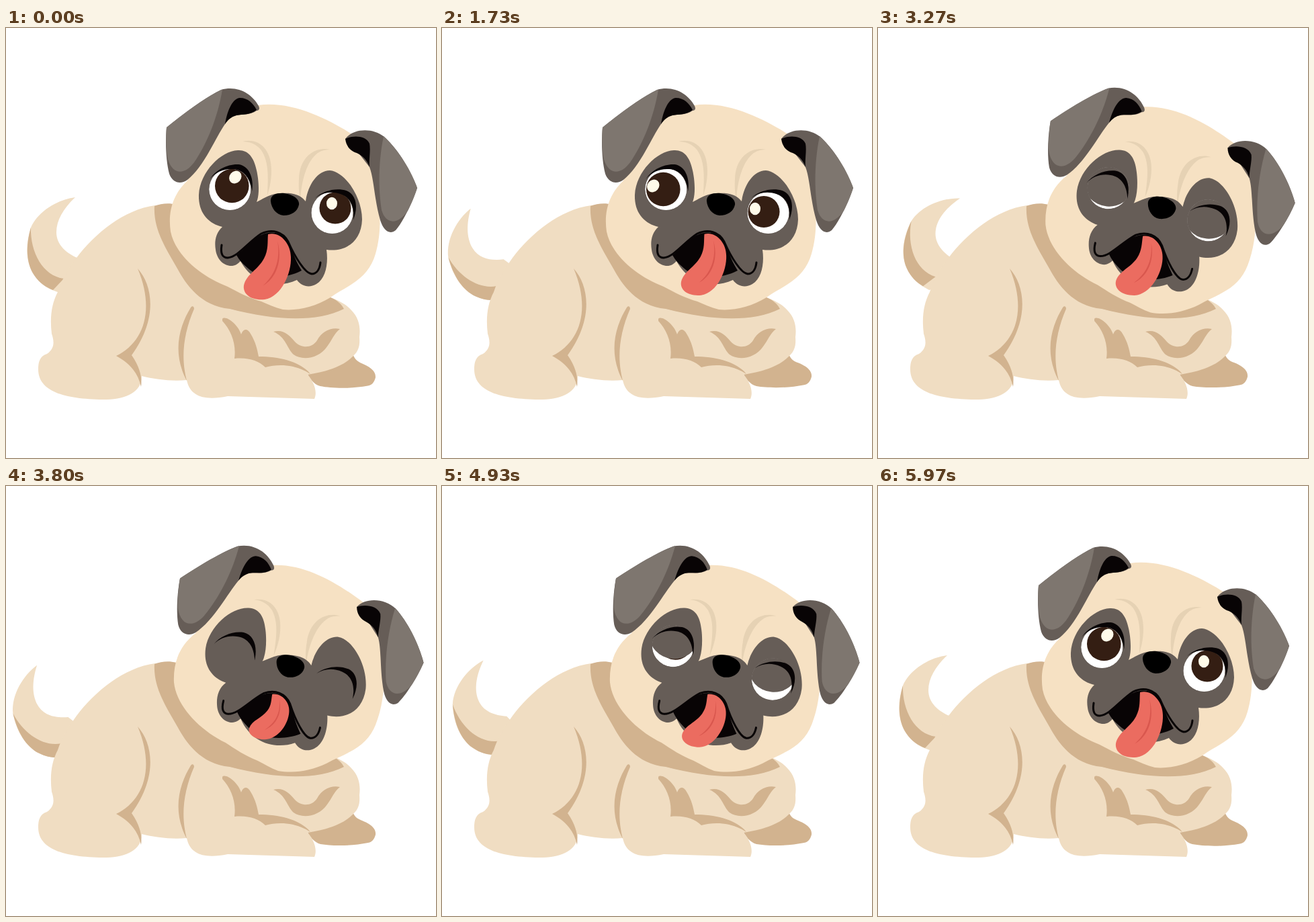
An HTML page that plays this animation: 640 px wide and 640 px high, repeating every 6.01 s.

```html
<!DOCTYPE html>
<html lang="en">
<head>
<meta charset="utf-8">
<title>Happy pug</title>
<style>
  html, body { margin: 0; width: 100%; height: 100%; overflow: hidden; background: #fff; }
  svg { display: block; width: 100vw; height: 100vh; }
  .coat { fill: #f0ddc2; }
  .face { fill: #f6e1c3; }
  .shade { fill: #d2b38f; }
  .fold { fill: #e6d2b4; }
  .mask { fill: #665d57; }
  .ear { fill: #7e766f; }
  .ink { fill: #080405; }
  .nose { fill: #000; }
  .white { fill: #fff; }
  .iris { fill: #341e13; }
  .glint { fill: #fffbea; }
  .tongue { fill: #eb6c60; }
  .crease { fill: #d9574e; }
  .lip { fill: none; stroke: #080405; stroke-width: 3; stroke-linecap: round; }
</style>
</head>
<body>
<svg viewBox="0 0 640 640" xmlns="http://www.w3.org/2000/svg">
  <defs>
    <clipPath id="socket"><circle r="31.3"/></clipPath>
  </defs>

  <g id="tail">
    <path class="coat" d="M103 252C78 255 48 272 37 297C28 325 30 350 42 368C52 383 66 390 80 394L120 375L106 342C90 335 75 323 75 304C75 285 87 267 103 252Z"/>
    <path class="shade" d="M37 297C29 325 30 350 42 368C50 380 60 386 70 390L86 373C55 369 36 334 37 297Z"/>
  </g>

  <path id="paw" class="shade" d="M514 480C518 492 522 495 530 498C545 504 551 511 550 519C548 526 545 530 539 531C515 536 485 536 468 533C458 530 452 522 446 510Z"/>

  <path class="coat" d="M105 342C132 306 176 270 222 264L252 262L400 330L483 401C498 407 507 412 514 420C525 431 528 445 526 460C527 472 525 481 517 488C502 504 478 511 449 516C458 526 464 541 459 552L330 548C296 555 274 549 269 524C246 526 222 523 202 518C203 540 180 553 150 553C92 553 48 543 48 508C48 498 50 488 61 485C74 476 71 464 68 455C65 430 68 410 77 393C82 377 92 360 105 342Z"/>
  <path class="shade" d="M221 265C230 261 245 260 252 263L340 320L483 401C492 405 498 409 503 418C460 439 400 435 333 418C290 414 268 382 255 358C238 328 219 300 221 265Z"/>

  <g class="shade">
    <path d="M196 358C220 385 225 435 187 487C198 503 203 518 201 534C197 515 186 500 164 488C205 468 222 420 196 358Z"/>
    <path d="M275 416C259 442 246 482 269 525C260 490 264 455 280 418C280 414 277 413 275 416Z"/>
    <path d="M322 433C326 427 345 440 350 456C353 448 359 446 364 455C372 468 374 479 376 489C410 489 440 498 453 515C430 500 405 500 386 505C376 495 360 490 340 492C343 470 335 450 322 436Z"/>
    <path d="M398 452C412 448 421 456 430 467C440 477 455 477 463 465C470 452 483 445 497 448C488 455 485 465 478 474C465 493 440 495 428 486C418 477 417 460 398 452Z"/>
  </g>

  <g id="head">
    <path class="face" d="M375 115C425 108 478 135 515 158C540 180 550 215 555 255C558 285 557 312 550 336C544 357 532 370 515 381C505 388 494 393 483 401C460 415 435 421 412 419C400 416 390 411 380 407C362 402 345 393 330 385C290 370 252 338 245 303C241 275 247 249 270 227C285 195 310 115 375 115Z"/>

    <path class="mask" d="M239 148C265 127 297 103 320 92C345 85 366 98 376 116C378 120 377 123 373 123C363 130 352 128 343 130C335 132 330 137 326 143C312 163 295 206 270 226C260 233 248 231 243 217C238 198 237 170 239 148Z"/>
    <path class="ear" d="M239 148C265 127 297 103 322 91.5C315 134 299 172 280 200C266 219 247 220 240 192C238 175 238 160 239 148Z"/>
    <path class="ink" d="M326 143C330 120 338 105 348 104C360 104 368 112 373 122C363 130 352 128 343 130C335 132 330 137 326 143Z"/>

    <path class="mask" d="M505 165C515 150 545 147 563 162C585 182 604 215 612 238C605 260 590 290 580 301C571 308 562 302 557 286C548 255 548 225 541 207L520 180Z"/>
    <path class="ear" d="M562 161C585 182 604 215 612 238C608 251 603 262 598 272C583 294 565 292 559 271C554 240 554 200 562 161Z"/>
    <path class="ink" d="M505 165C515 160 535 159 541 172C543 182 540 195 541 207C537 195 530 190 522 186C512 183 506 175 505 165Z"/>

    <g class="fold">
      <path d="M352 169C376 163 395 180 395 212C395 230 391 242 389 249C390 225 392 200 380 182C372 172 362 169 352 169Z"/>
      <path d="M482 181C462 176 437 190 436 225C435 240 437 250 438 256C440 225 448 198 464 186C470 182 476 181 482 181Z"/>
    </g>

    <path class="mask" d="M373 259C378 247 376 225 373 212C369 192 360 181 345 182C320 183 289 214 287 248C286 275 301 291 322 296C312 305 310 318 312 330C314 345 325 355 337 354C343 353 346 350 349 347C368 382 405 388 433 375C440 385 452 387 462 381C476 373 480 350 477 330C505 334 529 318 530 285C530 252 505 214 482 212C463 212 449 235 446 258C437 247 425 245 410 246C395 246 385 253 373 259Z"/>
    <path class="nose" d="M394 258C393 248 404 245 414 246C428 248 437 255 436 263C434 273 425 279 413 279C402 278 395 268 394 258Z"/>

    <path class="ink" d="M343 338C360 326 372 307 390 305C410 302 419 315 424 325C430 345 435 352 440 361C416 374 380 374 363 360C352 351 347 345 343 338Z"/>
    <g id="tongue">
      <path class="tongue" d="M390 307C407 302 424 320 424 341C425 365 410 400 385 404C365 406 352 396 354 383C358 366 375 360 384 343C391 330 389 318 390 307Z"/>
      <path class="crease" d="M404 317C412 345 403 372 382 384C400 368 409 346 404 317Z"/>
    </g>
    <path class="lip" d="M321 323C319 336 322 342 330 342C345 341 360 319 380 306C396 299 412 303 420 318C430 341 445 365 455 366C463 366 467 358 468 349"/>
    <g id="eyes"></g>
  </g>
</svg>
<script>
const LOOP = 6010;
const SWING = 41.6;

const $ = id => document.getElementById(id);
const mix = (a, b, k) => a + (b - a) * k;
const move = (node, transform) => node.setAttribute("transform", transform);

// Smooth step from 0 to 1 between two times.
function ease(t, from, to) {
  const u = Math.min(1, Math.max(0, (t - from) / (to - from)));
  return u * u * (3 - 2 * u);
}

// Each part of an eye lists its place when looking up and when looking aside.
function makeEye({ x, y, size, slant, iris, glint }) {
  const eye = document.createElementNS("http://www.w3.org/2000/svg", "g");
  move(eye, `translate(${x} ${y})`);
  eye.innerHTML = `
    <g class="ball" clip-path="url(#socket)">
      <circle class="white" r="31"/>
      <circle class="iris" r="${25.3 * size}"/>
      <ellipse class="glint" rx="${8.6 * size}" ry="${10 * size}"/>
      <ellipse class="lid mask" rx="36" ry="32.5"/>
    </g>
    <g class="lash ink">
      <path transform="rotate(${slant})" d="M-30 -15C-21 -29 -3 -38 13 -37C28 -35 36 -18 33 3C31 -16 21 -29 5 -30C-9 -31 -21 -26 -30 -15Z"/>
    </g>`;
  $("eyes").append(eye);
  const part = name => eye.querySelector("." + name);

  return (look, lid, tilt) => {
    const between = ([a, b], k) => [mix(a[0], b[0], k), mix(a[1], b[1], k)];
    const [ix, iy] = between(iris, look);
    const [gx, gy] = between(glint, look);
    move(part("iris"), `translate(${ix} ${iy})`);
    move(part("glint"), `translate(${gx + tilt * 0.5} ${gy + tilt * 0.75}) rotate(${slant ? 0 : 40})`);
    part("lid").setAttribute("cy", -66 * Math.pow(1 - lid, 2.4));
    part("ball").style.display = lid > 0.99 ? "none" : "";
    move(part("lash"), `translate(${-5 * lid} ${16 * lid})`);
  };
}

const eyes = [
  makeEye({ x: 333.3, y: 240, size: 1, slant: 0, iris: [[3, -5], [-4, 0]], glint: [[8, -18], [-19, -5]] }),
  makeEye({ x: 485.5, y: 275, size: 0.93, slant: 14, iris: [[4.5, -7], [-6.5, -1.5]], glint: [[-0.5, -14], [-19.5, -6]] })
];

// Up to the right, a long rest on the left, then a steady wag that settles.
function wag(t) {
  const half = 515, begin = 2700, end = begin + 5 * half;
  const beat = (Math.min(end, Math.max(begin, t)) - begin) / half;
  return 10.6 * (ease(t, 0, 630) - ease(t, end, 5990))
    + SWING * ((1 - Math.cos(Math.PI * beat)) / 2 - ease(t, 630, 1270));
}

function draw(t) {
  const breath = Math.cos(t / LOOP * 8 * Math.PI);
  const tilt = 5.55 * (ease(t, 2590, 3440) - ease(t, 5540, 5970));
  const look = ease(t, 0, 1270) - ease(t, 2300, 3500);
  const lid = ease(t, 2800, 3580) - ease(t, 4650, 5200);
  const tap = 4 * (ease(t, 950, 1300) - ease(t, 1300, 1650))
    + 1.2 * Math.pow(Math.max(0, breath), 3);

  move($("tail"), `rotate(${wag(t)} 103 369)`);
  move($("paw"), `rotate(${tap} 462 512)`);
  move($("head"), `rotate(${tilt} 358 349)`);
  eyes.forEach(pose => pose(look, lid, tilt));

  const reach = (1 + breath) / 2;
  move($("tongue"), `translate(402 305) scale(${mix(0.81, 1, reach)} ${mix(0.7, 1, reach)}) translate(-402 -305)`);
}

const start = performance.now();
function tick() {
  draw((performance.now() - start) % LOOP);
  requestAnimationFrame(tick);
}
tick();
</script>
</body>
</html>
```
